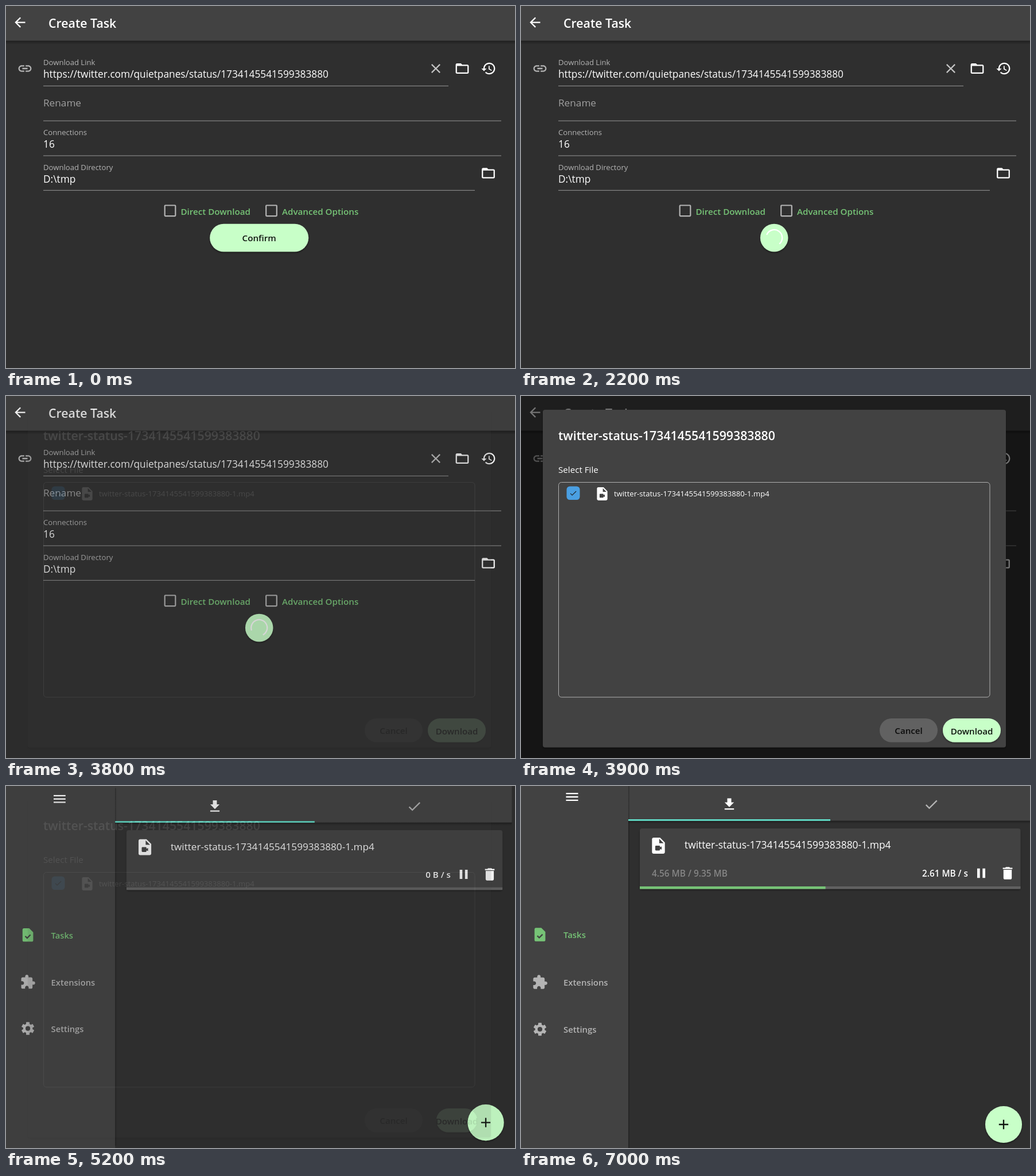
An HTML page for the animation above (7500 ms loop, 887 px wide and 631 px high).

```html
<!DOCTYPE html>
<html lang="en">
<head>
<meta charset="utf-8">
<title>Create Task</title>
<style>
html, body { margin: 0; width: 100%; height: 100%; overflow: hidden; background: #2f2f2f; }
svg { display: block; width: 887px; height: 631px; font-family: "Open Sans", "Noto Sans", sans-serif; }
text { white-space: pre; }
.b { font-weight: 600; }
.mid { text-anchor: middle; }
.end { text-anchor: end; }
</style>
</head>
<body>
<svg id="stage" viewBox="0 0 887 631">
  <defs>
    <linearGradient id="drop" x2="0" y2="1">
      <stop offset="0" stop-opacity=".38"/><stop offset="1" stop-opacity="0"/>
    </linearGradient>
    <linearGradient id="side">
      <stop offset="0" stop-opacity=".3"/><stop offset="1" stop-opacity="0"/>
    </linearGradient>
    <filter id="soft" x="-20%" y="-20%" width="140%" height="150%">
      <feDropShadow dx="0" dy="2" stdDeviation="1.6" flood-opacity=".4"/>
    </filter>
  </defs>
  <g id="create"></g>
  <g id="home"></g>
  <rect id="scrim" width="887" height="631"/>
  <g id="dialog"></g>
</svg>
<script>
const LOOP = 7500, STEP = 100;
const MINT = '#c8ffc8', GREEN = '#76c376', PANEL = '#424242', GREY = '#b4b4b4';
const ID = '1734145541599383880';
const FILE = `twitter-status-${ID}-1.mp4`;
const $ = id => document.getElementById(id);
const clamp = v => Math.max(0, Math.min(1, v));
const ramp = (t, a, b) => clamp((t - a) / (b - a));

const SHEET = 'M14 2H6c-1.1 0-1.99.9-1.99 2L4 20c0 1.1.89 2 1.99 2H18c1.1 0 2-.9 2-2V8l-6-6z';
const ICONS = {
  back: 'M20 11H7.83l5.59-5.59L12 4l-8 8 8 8 1.41-1.41L7.83 13H20v-2z',
  link: 'M3.9 12c0-1.71 1.39-3.1 3.1-3.1h4V7H7c-2.76 0-5 2.24-5 5s2.24 5 5 5h4v-1.9H7c-1.71 0-3.1-1.39-3.1-3.1zM8 13h8v-2H8v2zm9-6h-4v1.9h4c1.71 0 3.1 1.39 3.1 3.1s-1.39 3.1-3.1 3.1h-4V17h4c2.76 0 5-2.24 5-5s-2.24-5-5-5z',
  close: 'M19 6.41L17.59 5 12 10.59 6.41 5 5 6.41 10.59 12 5 17.59 6.41 19 12 13.41 17.59 19 19 17.59 13.41 12z',
  folder: 'M20 6h-8l-2-2H4c-1.1 0-2 .9-2 2v12c0 1.1.9 2 2 2h16c1.1 0 2-.9 2-2V8c0-1.1-.9-2-2-2zm0 12H4V8h16v10z',
  history: 'M13 3c-4.97 0-9 4.03-9 9H1l3.89 3.89.07.14L9 12H6c0-3.87 3.13-7 7-7s7 3.13 7 7-3.13 7-7 7c-1.93 0-3.68-.79-4.94-2.06l-1.42 1.42C8.27 19.99 10.51 21 13 21c4.97 0 9-4.03 9-9s-4.03-9-9-9zm-1 5v5l4.28 2.54.72-1.21-3.5-2.08V8H12z',
  video: SHEET + 'M13 9V3.5L18.5 9H13zm1 5 2-1.06v4.12L14 16v1c0 .55-.45 1-1 1H9c-.55 0-1-.45-1-1v-4c0-.55.45-1 1-1h4c.55 0 1 .45 1 1v1z',
  task: SHEET + 'm-3.06 16L7.4 14.46l1.41-1.41 2.12 2.12 4.24-4.24 1.41 1.41L10.94 18z',
  puzzle: 'M20.5 11H19V7c0-1.1-.9-2-2-2h-4V3.5C13 2.12 11.88 1 10.5 1S8 2.12 8 3.5V5H4c-1.1 0-2 .9-2 2v3.8h1.5c1.49 0 2.7 1.21 2.7 2.7s-1.21 2.7-2.7 2.7H2V20c0 1.1.9 2 2 2h3.8v-1.5c0-1.49 1.21-2.7 2.7-2.7s2.7 1.21 2.7 2.7V22H17c1.1 0 2-.9 2-2v-4h1.5c1.38 0 2.5-1.12 2.5-2.5S21.88 11 20.5 11z',
  trash: 'M6 19c0 1.1.9 2 2 2h8c1.1 0 2-.9 2-2V7H6v12zM19 4h-3.5l-1-1h-5l-1 1H5v2h14V4z',
  pause: 'M6 19h4V5H6v14zm8-14v14h4V5h-4z',
  download: 'M19 9h-4V3H9v6H5l7 7 7-7zM5 18v2h14v-2H5z',
  check: 'M9 16.17L4.83 12l-1.42 1.41L9 19 21 7l-1.41-1.41z',
  menu: 'M3 18h18v-2H3v2zm0-5h18v-2H3v2zm0-7v2h18V6H3z',
  plus: 'M19 13h-6v6h-2v-6H5v-2h6V5h2v6h6v2z'
};

const icon = (name, x, y, fill = '#fff', k = 1.14) =>
  `<path fill="${fill}" fill-rule="evenodd" transform="translate(${x} ${y}) scale(${k}) translate(-12 -12)" d="${ICONS[name]}"/>`;
const text = (s, x, y, size, fill = '#fff', cls = '', id = '') =>
  `<text x="${x}" y="${y}" font-size="${size}" fill="${fill}" class="${cls}" id="${id}">${s}</text>`;
const rect = (x, y, w, h, fill, extra = '') =>
  `<rect x="${x}" y="${y}" width="${w}" height="${h}" fill="${fill}" ${extra}/>`;
const line = (y, x2) => rect(65, y, x2 - 65, 1.14, '#8a8a8a');
const box = x => rect(x, 347.5, 18.6, 18.6, 'none', `stroke="${GREY}" stroke-width="2.2" rx="1"`);

// Pill button that can squeeze into a circle and show a spinner.
const pill = (id, label, cx, cy, w, h, y, size) =>
  `<g filter="url(#soft)">${rect(cx - w / 2, cy - h / 2, w, h, MINT, `rx="${h / 2}" id="${id}Bg"`)}</g>` +
  text(label, cx, y, size, '#101510', 'b mid', id + 'Label') +
  `<path id="${id}Arc" fill="none" stroke="#fff" stroke-width="2.3"/>`;

const gear = (x, y, fill) => {
  let teeth = '';
  for (let a = 0; a < 360; a += 60)
    teeth += rect(-2.6, -9.9, 5.2, 5, fill, `rx=".6" transform="rotate(${a})"`);
  return `<g transform="translate(${x} ${y}) scale(1.14)">${teeth}<circle r="5.5" fill="none" stroke="${fill}" stroke-width="3.8"/></g>`;
};

$('create').innerHTML =
  rect(0, 0, 887, 631, '#2f2f2f') + rect(0, 60, 887, 7, 'url(#drop)') + rect(0, 0, 887, 60.5, PANEL) +
  icon('back', 24.4, 28.6) + text('Create Task', 74, 38, 21.3, '#fff', 'b') +
  icon('link', 33, 109, GREY) +
  text('Download Link', 65, 103.3, 13.1, GREY) +
  text(`https://twitter.com/quietpanes/status/${ID}`, 65, 125, 17.3) +
  icon('close', 749, 109, '#c4c4c4') + icon('folder', 795, 109) + icon('history', 841, 109) + line(138.8, 771) +
  text('Rename', 65, 175, 17.2, '#a0a0a0') + line(199.6, 863) +
  text('Connections', 65, 225, 13.1, GREY) + text('16', 65, 247, 17.3) + line(260.4, 863) +
  text('Download Directory', 65, 286, 13.1, GREY) + text('D:\\tmp', 65, 308, 17.3) +
  icon('folder', 840.5, 291.3) + line(320.8, 817) +
  box(276.7) + text('Direct Download', 304.5, 363.5, 15.15, GREEN, 'b') +
  box(453.2) + text('Advanced Options', 481, 363.5, 15.15, GREEN, 'b') +
  pill('confirm', 'Confirm', 441.2, 404, 172, 48.5, 410, 15.15);

$('dialog').innerHTML =
  rect(38, 24, 807, 588.5, PANEL, 'rx="4" filter="url(#soft)"') +
  text(`twitter-status-${ID}`, 65, 76.5, 21.3, '#fff', 'b') +
  text('Select File', 65, 134, 15.2) +
  rect(65.5, 150.5, 751.5, 374.5, 'none', 'rx="5" stroke="#b0b0b0"') +
  rect(79.5, 157.5, 23, 23.5, '#4a9fe2', 'rx="5.5"') + icon('check', 91, 169.5, '#202a33', .62) +
  icon('video', 141.5, 170.5) + text(FILE, 162, 175, 13.1) +
  rect(625, 562, 101, 41.5, '#616161', 'rx="20.7"') + text('Cancel', 675.5, 589, 15.15, '#0c0c0c', 'b mid') +
  pill('load', 'Download', 785.5, 582.8, 101, 41.5, 589.5, 15.15);

$('home').innerHTML =
  rect(-80, -80, 1060, 800, '#2f2f2f') +
  rect(187, 60, 700, 6, 'url(#drop)') + rect(187, -80, 700, 140.5, PANEL) +
  rect(-80, -80, 267, 800, PANEL) + rect(187, 0, 3, 631, 'url(#side)') +
  rect(187, 58, 352, 2.7, '#62e3cd') +
  icon('menu', 89, 19, '#fff', 1.17) + icon('download', 363, 32, '#fff', 1.17) + icon('check', 715, 32, GREY, 1.17) +
  icon('task', 33, 259, GREEN, 1.18) + text('Tasks', 74, 265, 14.9, GREEN, 'b') +
  icon('puzzle', 33, 342, GREY, 1.17) + text('Extensions', 74, 348, 14.9, GREY, 'b') +
  gear(33, 424, GREY) + text('Settings', 74, 430, 14.9, GREY, 'b') +
  rect(207, 74, 663.5, 105.5, PANEL, 'rx="4" filter="url(#soft)"') +
  icon('video', 239.5, 104, '#fff', 1.4) + text(FILE, 285, 109, 17.4) +
  text('', 228, 158, 15.4, '#858585', 'b', 'size') + text('', 779, 158, 15.3, '#fff', 'b end', 'speed') +
  icon('pause', 802, 152, '#fff', 1.17) + icon('trash', 848, 152, '#fff', 1.2) +
  rect(207, 175, 663.5, 4.5, '#616161') + rect(207, 175, 0, 4.5, GREEN, 'id="bar"') +
  `<circle cx="841" cy="590" r="32" fill="${MINT}" filter="url(#soft)"/>` + icon('plus', 841, 590, '#101510', 1.17);

const inOutCirc = t => t < .5
  ? (1 - Math.sqrt(1 - 4 * t * t)) / 2
  : (1 + Math.sqrt(1 - (2 - 2 * t) ** 2)) / 2;

// cubic-bezier(.4, 0, .2, 1)
function fastOutSlowIn(x) {
  let lo = 0, hi = 1, s = .5;
  for (let i = 0; i < 24; i++) {
    s = (lo + hi) / 2;
    const u = 1 - s;
    if (1.2 * u * u * s + .6 * u * s * s + s ** 3 < x) lo = s; else hi = s;
  }
  return 3 * (1 - s) * s * s + s ** 3;
}

// Material indeterminate spinner: growing head, chasing tail, steady rotation.
function arc(cx, cy, r, t) {
  const cycle = (t / 1333) % 1, span = 1.5 * Math.PI;
  const head = fastOutSlowIn(clamp(cycle * 2)) * span;
  const tail = fastOutSlowIn(clamp(cycle * 2 - 1)) * span;
  const a = -Math.PI / 2 + tail + (t / 2222 % 1) * 2 * Math.PI + cycle * Math.PI / 2;
  const sweep = Math.max(head - tail, .01);
  const at = v => `${cx + r * Math.cos(v)} ${cy + r * Math.sin(v)}`;
  return `M${at(a)}A${r} ${r} 0 ${+(sweep > Math.PI)} 1 ${at(a + sweep)}`;
}

function setPill(id, cx, cy, w, h, r, s) {
  const width = w + (h - w) * inOutCirc(s.squeeze);
  const bg = $(id + 'Bg'), k = 1 - s.shade;
  bg.setAttribute('x', cx - width / 2);
  bg.setAttribute('width', width);
  bg.setAttribute('fill', `rgb(${200 * k},${255 * k},${200 * k})`);
  $(id + 'Label').setAttribute('opacity', 1 - s.busy);
  $(id + 'Arc').setAttribute('opacity', s.busy);
  $(id + 'Arc').setAttribute('d', arc(cx, cy, r, Math.max(0, s.spin)));
}

function draw(t) {
  setPill('confirm', 441.2, 404, 172, 48.5, 14, {
    squeeze: ramp(t, 880, 1380),
    shade: t < 500 ? 0 : (.08 + .14 * ramp(t, 600, 900)) * (1 - ramp(t, 1000, 1400)),
    busy: ramp(t, 650, 800),
    spin: (t - 674) * 1.09
  });
  setPill('load', 785.5, 582.8, 101, 41.5, 12, {
    squeeze: ramp(t, 4950, 5450),
    shade: .22 * ramp(t, 4500, 4800) * (1 - ramp(t, 4900, 5200)),
    busy: ramp(t, 4550, 4700) * (1 - ramp(t, 5000, 5150)),
    spin: (t - 4575) * 1.09
  });

  const shown = t < 3800 || t >= 5400 ? 0 : t < 3900 ? .13 : t < 5100 ? 1 : t < 5200 ? .5 : t < 5300 ? .1 : .03;
  $('dialog').setAttribute('opacity', shown);
  $('scrim').setAttribute('opacity', .54 * shown);

  const home = t < 5100 ? 0 : t < 5200 ? .7 : 1;
  const zoom = t < 5400 ? 1 - .0124 * .35 ** ((t - 5200) / 100) : 1;
  $('home').setAttribute('opacity', home);
  $('home').setAttribute('transform', home ? `translate(443.5 315.5) scale(${zoom}) translate(-443.5 -315.5)` : '');

  const done = t < 6100 ? 0 : t < 7000 ? 1.95 : 4.56;
  $('size').textContent = done ? `${done.toFixed(2)} MB / 9.35 MB` : '';
  $('speed').textContent = done ? `${t < 7000 ? '1.95' : '2.61'} MB / s` : '0 B / s';
  $('bar').setAttribute('width', 663.5 * done / 9.35);
}

function tick() {
  draw(Math.floor(performance.now() % LOOP / STEP) * STEP);
  requestAnimationFrame(tick);
}
tick();
</script>
</body>
</html>
```
